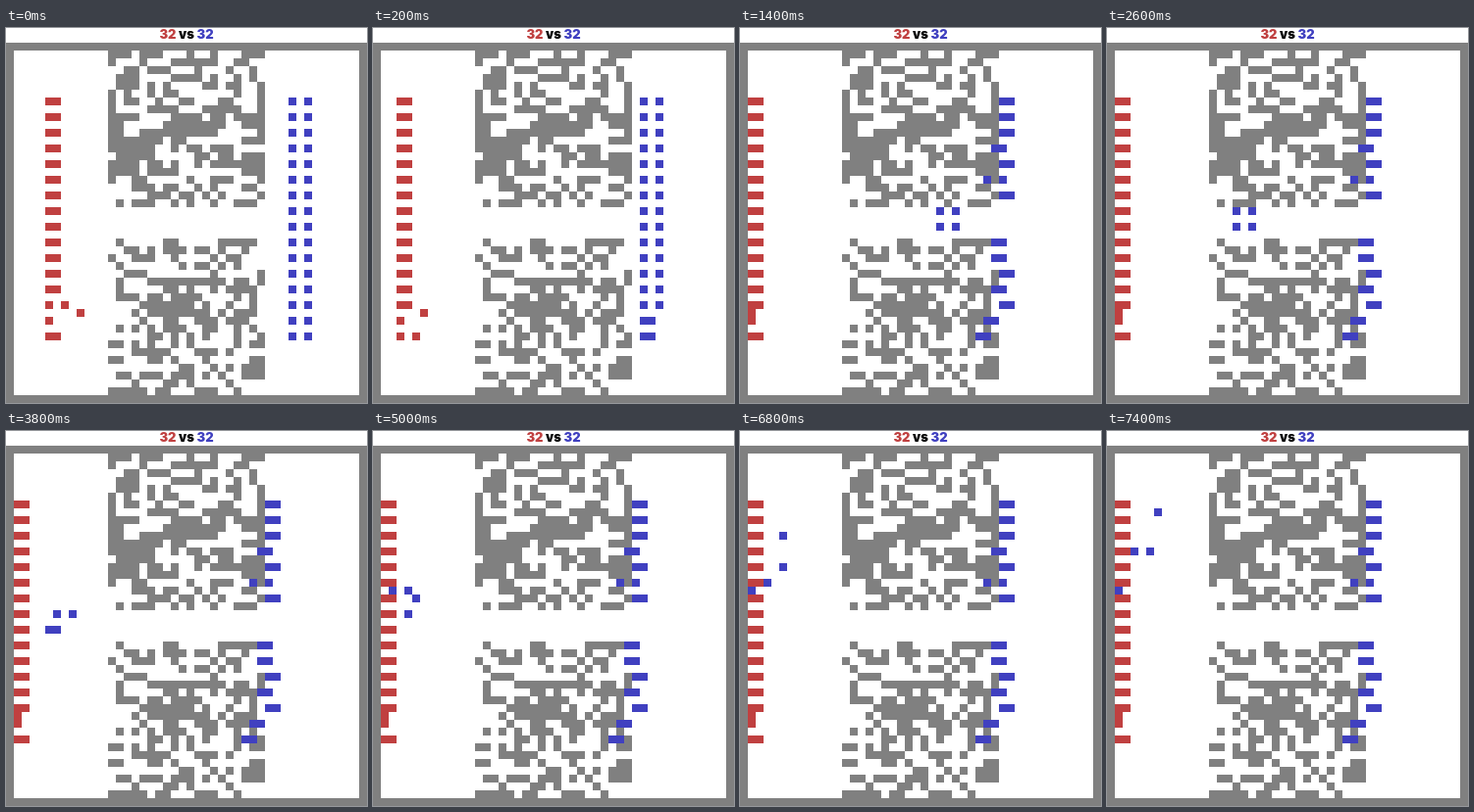
These frames come from a looping animation (368 by 383 pixels, 8 s). An HTML page with a canvas:

```html
<!DOCTYPE html>
<html>
<head>
<meta charset="utf-8">
<style>
  html, body { margin: 0; width: 100%; height: 100%; overflow: hidden; background: #fff; }
  canvas { display: block; }
</style>
</head>
<body>
<canvas id="stage" width="368" height="383"></canvas>
<script>
const ctx = document.getElementById('stage').getContext('2d');
const GRAY = '#808080', RED = '#c04040', BLUE = '#4040c0';
const CELL = 8, TOP = 15, LOOP = 8000;
const ROWS = Array.from({ length: 16 }, (_, i) => 7 + 2 * i);

// Column where each blue pair settles, top to bottom.
const REST = [33, 33, 33, 32, 33, 33, 33, 30, 30, 32, 32, 33, 32, 33, 31, 30];

// Way points of the four scouts once they leave the gap.
const PATHS = [
  [[6, 21], [4, 19], [4, 18], [4, 16], [4, 14], [5, 11], [6, 8]],
  [[8, 21], [5, 21], [5, 19], [6, 18], [5, 16], [5, 15], [5, 13]],
  [[5, 23], [3, 21], [2, 18], [1, 18]],
  [[6, 23], [4, 23], [4, 21], [4, 20], [3, 18], [3, 17], [3, 13]]
];

const at = (list, i) => list[Math.min(i, list.length - 1)];

function redUnits(step) {
  const left = at([5, 3, 1], step);
  return ROWS.flatMap(row => {
    let second = [left + 1, row];
    if (row === 33) second = [at([7, 4, 2], step), row];
    if (row === 35) second = [at([9, 6, 2, 1], step), 34];
    if (row === 37) second = [at([6, 5, 2], step), row];
    return [[left, row], second];
  });
}

function blueUnits(step) {
  return ROWS.flatMap((row, i) => {
    const scout = i === 7 || i === 8;
    if (scout && step > 6) {
      return PATHS.slice((i - 7) * 2, (i - 7) * 2 + 2).map(path => at(path, step - 7));
    }
    let left = REST[i], gap = 1;
    if (step < 2) {
      left = step ? 34 : 36;
      gap = step && i > 13 ? 1 : 2;
    } else if (scout) {
      left = Math.round(30 - 4.8 * (step - 2));
      gap = 2;
    } else if (row === 17 && step > 2) {
      left = 31;
      gap = 2;
    }
    return [[left, row], [left + gap, row]];
  });
}

// Random rubble in short runs, with a few solid pieces.
function buildWall() {
  let seed = 32;
  const random = () => (seed = (seed * 16807) % 2147483647) / 2147483647;
  const solidPieces = [[14, 12, 5, 3], [13, 7, 1, 6], [32, 7, 1, 6], [31, 31, 1, 7], [13, 44, 5, 1]];
  const inPiece = (col, row) => solidPieces.some(([x, y, w, h]) =>
    col >= x && col < x + w && row >= y && row < y + h);
  const resting = new Set(blueUnits(13).map(String));
  const cells = [];
  for (let row = 1; row < 45; row++) {
    let solid = false;
    for (let col = 13; col < 33; col++) {
      solid = random() < (solid ? 0.55 : 0.4);
      const inGap = row > 20 && row < 25;
      const open = inGap || resting.has(col + ',' + row);
      if (!open && (solid || inPiece(col, row))) cells.push([col, row]);
    }
  }
  return cells;
}

const WALL = buildWall();

function fillCells(cells, color) {
  ctx.fillStyle = color;
  for (const [col, row] of cells) ctx.fillRect(col * CELL, TOP + row * CELL, CELL, CELL);
}

function drawScore() {
  ctx.font = '900 13px Inter, sans-serif';
  const parts = [['32', RED], [' vs ', '#000'], ['32', BLUE]];
  let x = 184 - ctx.measureText('32 vs 32').width / 2;
  for (const [text, color] of parts) {
    ctx.fillStyle = color;
    ctx.fillText(text, x, 11);
    x += ctx.measureText(text).width;
  }
}

function draw(now) {
  const time = now % LOOP;
  const step = time < 200 ? 0 : 1 + Math.floor((time - 200) / 600);
  ctx.fillStyle = '#fff';
  ctx.fillRect(0, 0, 368, 383);
  drawScore();
  ctx.fillStyle = GRAY;
  ctx.fillRect(0, TOP, 368, 368);
  ctx.fillStyle = '#fff';
  ctx.fillRect(CELL, TOP + CELL, 352, 352);
  fillCells(WALL, GRAY);
  fillCells(redUnits(step), RED);
  fillCells(blueUnits(step), BLUE);
}

const start = performance.now();
function tick() {
  draw(performance.now() - start);
  requestAnimationFrame(tick);
}
tick();
</script>
</body>
</html>
```
